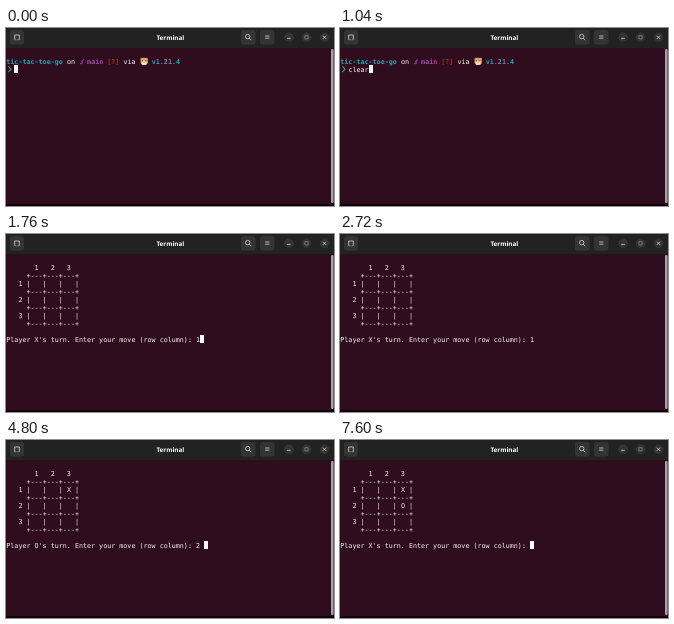
An HTML page that plays this animation: 328 by 178 pixels, repeating every 8000 ms.

```html
<!DOCTYPE html>
<html lang="en">
<head>
<meta charset="utf-8">
<title>Terminal</title>
<style>
  html, body { margin: 0; width: 100%; height: 100%; overflow: hidden; background: #300d1e; }
  svg { display: block; width: 328px; height: 178px; }
  text { white-space: pre; text-rendering: geometricPrecision; }
  .term { font: 6.71px "DejaVu Sans Mono", monospace; fill: #f4f0f0; }
  .b { font-weight: bold; }
  .title { font: bold 6.3px "Open Sans", "Noto Sans", sans-serif; fill: #fff; text-anchor: middle; }
  .btn { fill: #343434; }
  .icon { fill: none; stroke: #eee; stroke-width: .7; }
</style>
</head>
<body>
<svg viewBox="0 0 328 178">
  <rect width="328" height="178" fill="#300d1e"/>
  <rect width="328" height="20" fill="#222"/>
  <rect x="325" y="21" width="2.6" height="154" rx="1.2" fill="#aaa1a4"/>
  <rect y="176" width="328" height="2" fill="#100509"/>

  <text class="title" x="164.3" y="11.6">Terminal</text>
  <g class="btn">
    <rect x="4" y="2" width="14" height="14.5" rx="2.5"/>
    <rect x="235" y="2" width="14.5" height="14.5" rx="2.5"/>
    <rect x="254" y="2" width="14.5" height="14.5" rx="2.5"/>
    <circle cx="283" cy="9.3" r="4.8"/>
    <circle cx="300.5" cy="9.3" r="4.8"/>
    <circle cx="318.5" cy="9.3" r="4.8"/>
  </g>
  <g class="icon">
    <path d="M8.7 11.8V7h4.6v4.8"/>
    <path d="M8.7 11.8h4.6" opacity=".4"/>
    <circle cx="241.7" cy="8.6" r="2.2"/>
    <path d="M243.3 10.2l2 2M259.2 8h4.2M259.2 10.2h4.2"/>
    <path d="M281.2 10.4h3.4M316.9 7.7l3.2 3.2M320.1 7.7l-3.2 3.2"/>
    <path d="M298.9 7.7h3.2v3.2h-3.2z" opacity=".45"/>
  </g>

  <g id="shell" class="term">
    <g id="prompt"></g>
    <path d="M2.4 38.2l2.6 3-2.6 3" fill="none" stroke="#26a269" stroke-width="1.1"/>
    <path d="M74 35.6h2.2l1.2-4.8M75 34.6l1.5-2.4" fill="none" stroke="#a347ba" stroke-width=".8"/>
    <g>
      <circle cx="135.7" cy="31" r="1.3" fill="#c9864a"/>
      <circle cx="140.7" cy="31" r="1.3" fill="#c9864a"/>
      <circle cx="138.2" cy="33.4" r="3.7" fill="#e0a566"/>
      <ellipse cx="138.2" cy="35" rx="2.6" ry="1.9" fill="#f6e6d4"/>
      <circle cx="136.6" cy="32.8" r=".55" fill="#3a2418"/>
      <circle cx="139.8" cy="32.8" r=".55" fill="#3a2418"/>
      <circle cx="138.2" cy="34.2" r=".6" fill="#d8646e"/>
    </g>
    <text id="command"></text>
  </g>
  <g id="game" class="term"></g>
  <rect id="cursor" width="4" height="8" fill="#fff"/>
</svg>
<script>
const $ = id => document.getElementById(id);
const LOOP = 8000, CELL = 4.04;
const colX = c => 0.3 + c * CELL;
const rowY = r => 21 + r * 8;

function put(el, col, row, str) {
  el.setAttribute("x", colX(col));
  el.setAttribute("y", rowY(row) + 6.5);
  el.textContent = str;
}
function addText(parent, col, row, str = "", fill) {
  const el = document.createElementNS("http://www.w3.org/2000/svg", "text");
  if (fill) {
    el.setAttribute("class", "b");
    el.setAttribute("fill", fill);
  }
  put(el, col, row, str);
  return parent.appendChild(el);
}

const prompt = $("prompt"), game = $("game"), cursor = $("cursor");
addText(prompt, 0, 1, "tic-tac-toe-go", "#2aa1b3");
addText(prompt, 15, 1, "on");
addText(prompt, 20, 1, "main", "#a347ba");
addText(prompt, 25, 1, "[?]", "#c01c28");
addText(prompt, 29, 1, "via");
addText(prompt, 36, 1, "v1.21.4", "#2aa1b3");

addText(game, 7, 1, "1   2   3");
for (let i = 0; i < 4; i++) addText(game, 5, 2 + 2 * i, "+---+---+---+");
for (let i = 1; i < 4; i++) addText(game, 3, 1 + 2 * i, i + " |   |   |   |");
const markX = addText(game, 15, 3);
const markO = addText(game, 15, 5);
const ask = addText(game, 0, 10);

const GAME = 1200, MOVE_X = 3600, MOVE_O = 6480;
// [time, input so far, cursor visible]
const steps = [
  [0, "", 1], [320, "c", 1], [400, "cl", 1], [480, "clea", 1], [560, "clear", 1],
  [GAME, "", 1], [1760, "1", 1], [2160, "1 ", 1], [2720, "1 ", 0],
  [2960, "1 3", 1], [3520, "1 3", 0],
  [MOVE_X, "", 1], [4160, "", 0], [4320, "2", 1], [4800, "2 ", 1], [5360, "2 ", 0],
  [5840, "2 3", 1],
  [MOVE_O, "", 1], [7040, "", 0], [7600, "", 1]
];

function draw(t) {
  const [, input, on] = steps.findLast(s => s[0] <= t);
  const playing = t >= GAME;
  $("shell").style.display = playing ? "none" : "";
  game.style.display = playing ? "" : "none";

  put($("command"), 2, 2, input);
  const player = t >= MOVE_X && t < MOVE_O ? "O" : "X";
  const question = `Player ${player}'s turn. Enter your move (row column): `;
  put(ask, 0, 10, question + input);
  markX.textContent = t >= MOVE_X ? "X" : "";
  markO.textContent = t >= MOVE_O ? "O" : "";

  const col = (playing ? question.length : 2) + input.length;
  cursor.setAttribute("x", Math.round(colX(col)));
  cursor.setAttribute("y", rowY(playing ? 10 : 2));
  cursor.style.display = on ? "" : "none";
}

const start = performance.now();
function tick() {
  draw((performance.now() - start) % LOOP);
  requestAnimationFrame(tick);
}
tick();
</script>
</body>
</html>
```
